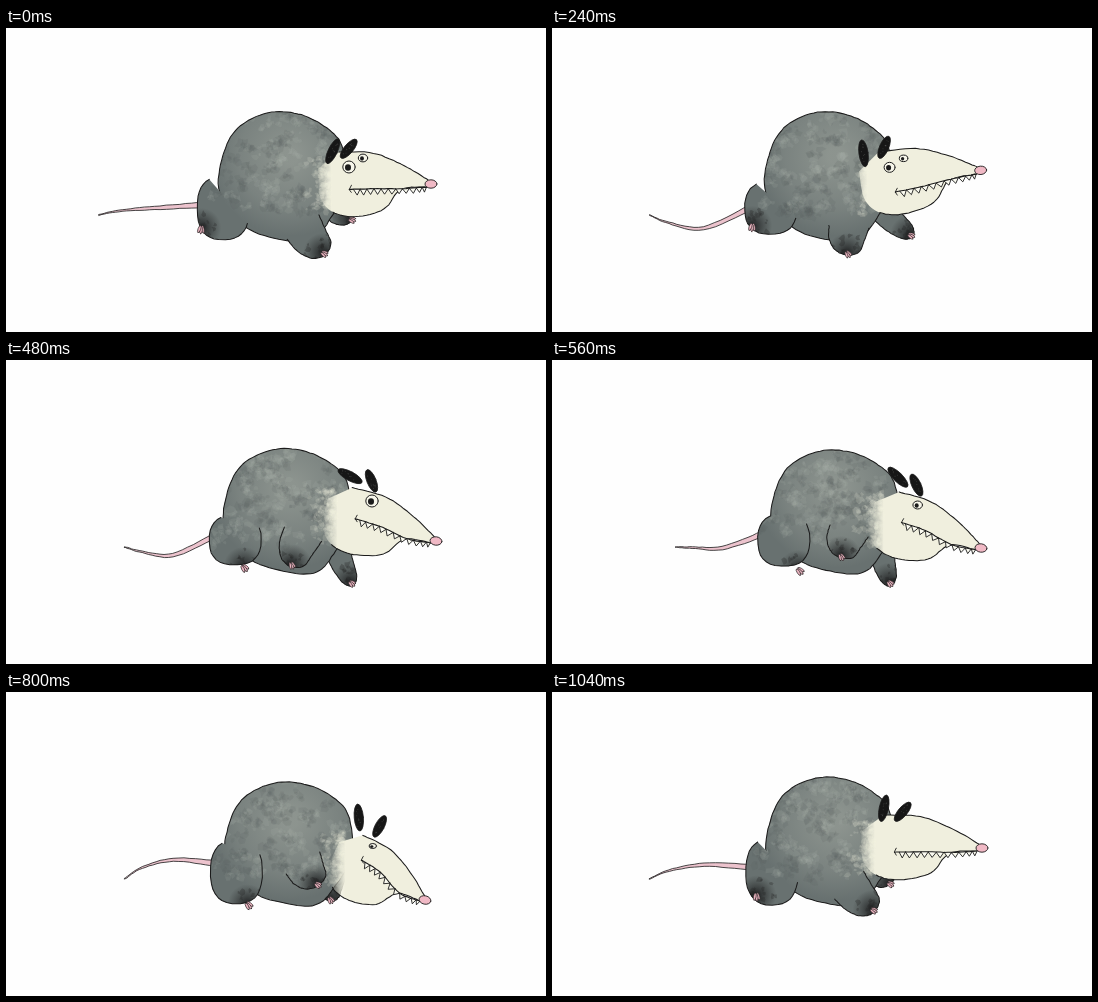
An HTML page with a canvas for the animation above (1.12 s loop, 540 by 304 pixels).

```html
<!DOCTYPE html>
<html lang="en">
<head>
<meta charset="utf-8">
<title>Trotting opossum</title>
<style>
html, body { margin: 0; width: 100%; height: 100%; overflow: hidden; background: #fefefe; }
canvas { display: block; width: 540px; height: 304px; }
</style>
</head>
<body>
<canvas id="stage" width="540" height="304"></canvas>
<script>
const W = 540, H = 304, STEP = 80, COUNT = 14;
const ctx = document.getElementById('stage').getContext('2d');
const INK = '#1b1b1b', CREAM = '240,239,222', PINK = '#e9b3bf';
const RAD = Math.PI / 180;

const clamp = (v, lo, hi) => Math.max(lo, Math.min(hi, v));
const mix = (a, b, t) => a + (b - a) * t;

let seed = 1;
function rnd() {
  seed = (seed * 16807) % 2147483647;
  return seed / 2147483647;
}
const span = (a, b) => mix(a, b, rnd());

// --- Motion -------------------------------------------------------------

// The head acts between these drawings; everything else swings with the gait.
const BEATS = [0, 2, 5, 6, 8, 10, 13];
const acting = {
  skullX: [330, 326, 332, 335, 335, 340, 328],
  skullY: [158, 161, 153, 160, 168, 173, 157],
  noseX: [425, 428, 430, 430, 428, 419, 430],
  noseY: [156, 147, 133, 181, 195, 208, 156],
  roll: [5, -7, 12, 35, 34, 28, 15],
  earA: [25, 20, -63, -62, -28, -5, 12],
  earB: [40, 50, -30, -22, -28, 28, 40],
  eye: [6, 5.5, 4, 6, 2, 2.5, 0]
};

function act(k) {
  const i = BEATS.filter(b => b <= k).length - 1, j = (i + 1) % BEATS.length;
  const t = (k - BEATS[i]) / ((BEATS[j] || COUNT) - BEATS[i]);
  const out = {};
  for (const name in acting) out[name] = mix(acting[name][i], acting[name][j], t);
  return out;
}

function gait(k) {
  const wave = (mid, amp, peak) => mid + amp * Math.cos((k - peak) / COUNT * 2 * Math.PI);
  return {
    shift: wave(3, 4, 8.5),
    near: [wave(303, 18, 12.5), Math.min(225, wave(211, 22, 1.8))],
    far: [wave(341, 17, 3), wave(207, 16, 6.5)],
    rear: [wave(221, 30, 8.2), wave(205, 8, 9)],
    thigh: wave(29, 4.5, 12),
    root: wave(176, 5, 3),
    sag: wave(184, 18, 4),
    tip: wave(108, 17, 8)
  };
}

// --- Drawing helpers ----------------------------------------------------

// Catmull-Rom samples, eight per span.
function spline(pts, closed) {
  const n = pts.length, out = [];
  const pt = i => pts[closed ? (i + n) % n : clamp(i, 0, n - 1)];
  for (let i = 0; i < (closed ? n : n - 1); i++) {
    const [a, b, c, d] = [pt(i - 1), pt(i), pt(i + 1), pt(i + 2)];
    for (let t = 0; t < 1; t += 1 / 8) {
      out.push([0, 1].map(m => b[m] + .5 * t * (c[m] - a[m] +
        t * (2 * a[m] - 5 * b[m] + 4 * c[m] - d[m] + t * (3 * (b[m] - c[m]) + d[m] - a[m])))));
    }
  }
  if (!closed) out.push(pt(n - 1));
  return out;
}

function trace(pts, closed, shake = 0) {
  ctx.beginPath();
  for (const [x, y] of pts) ctx.lineTo(x + span(-shake, shake), y + span(-shake, shake));
  if (closed) ctx.closePath();
}

function fill(pts, style) {
  trace(pts, true);
  ctx.fillStyle = style;
  ctx.fill();
}

function ink(pts, closed, width = 1.05) {
  trace(pts, closed, .25);
  ctx.strokeStyle = INK;
  ctx.lineWidth = width;
  ctx.stroke();
}

function oval(x, y, rx, ry, deg, style, line) {
  ctx.beginPath();
  ctx.ellipse(x, y, rx, ry, deg * RAD, 0, 7);
  ctx.fillStyle = style;
  ctx.fill();
  if (!line) return;
  ctx.strokeStyle = INK;
  ctx.lineWidth = line;
  ctx.stroke();
}

function blot(g, x, y, r, style) {
  g.fillStyle = style;
  g.beginPath();
  for (let a = 0; a < 7; a++) {
    const q = r * span(.4, 1.4);
    g.lineTo(x + q * Math.cos(a * .9), y + q * Math.sin(a * .9));
  }
  g.fill();
}

function clipped(pts, paint) {
  ctx.save();
  trace(pts, true);
  ctx.clip();
  paint();
  ctx.restore();
}

// Watercolour fur shared by trunk and legs.
function makeFur() {
  const c = document.createElement('canvas');
  c.width = W;
  c.height = H;
  const g = c.getContext('2d');
  g.fillStyle = '#687170';
  g.fillRect(0, 0, W, H);
  const glow = g.createRadialGradient(284, 128, 8, 284, 128, 80);
  glow.addColorStop(0, 'rgba(165,171,163,.6)');
  glow.addColorStop(.6, 'rgba(150,157,151,.4)');
  glow.addColorStop(1, 'rgba(150,157,151,0)');
  g.fillStyle = glow;
  g.fillRect(0, 0, W, H);
  for (let i = 0; i < 90; i++) {
    const x = span(205, 345), y = span(85, 185);
    const tone = rnd() < .5 ? 'rgba(180,185,174,.13)' : 'rgba(84,95,95,.15)';
    for (let j = 0; j < 6; j++) blot(g, x + span(-7, 7), y + span(-5, 5), span(1.5, 5), tone);
  }
  return ctx.createPattern(c, 'no-repeat');
}

// --- Body parts ---------------------------------------------------------

function drawLimb(pts, fur, [x, y]) {
  fill(pts, fur);
  clipped(pts, () => {
    const shade = ctx.createRadialGradient(x, y, 2, x, y, 20);
    shade.addColorStop(0, 'rgba(28,29,30,.85)');
    shade.addColorStop(1, 'rgba(45,48,48,0)');
    ctx.fillStyle = shade;
    ctx.fillRect(x - 20, y - 20, 40, 40);
    for (let i = 0; i < 24; i++) {
      const a = span(0, 6.3), d = span(3, 19);
      blot(ctx, x + d * Math.cos(a), y + d * Math.sin(a), span(1, 3.2), 'rgba(34,36,36,.3)');
    }
  });
  ink(pts, false);
}

function drawToes([x, y], angle, size) {
  ctx.save();
  ctx.translate(x, y);
  ctx.rotate(angle);
  ctx.scale(size, size);
  for (const s of [-1, 0, 1]) oval(2.5 - Math.abs(s), s * 2, 4.2, 1.5, s * 14, PINK, .7);
  ctx.restore();
}

// A leg narrows from the shoulder to the paw.
function drawLeg([sx, sy], paw, width, fur) {
  const dx = paw[0] - sx, dy = paw[1] - sy, len = Math.hypot(dx, dy);
  const at = (t, w) => [sx + dx * t - dy / len * w * width, sy + dy * t + dx / len * w * width];
  drawLimb(spline([at(0, 1), at(.5, .95), at(.92, .6), at(1.08, 0),
    at(.92, -.6), at(.5, -.8), at(0, -1)]), fur, paw);
  drawToes(paw, Math.atan2(dy, dx) * .6, .8);
}

function drawThigh(hip, paw, ry, fur) {
  const round = v => Math.sign(v) * Math.pow(Math.abs(v), .8);
  const last = 25 - (paw[0] - 194) * 1.1;
  const pts = [];
  for (let i = 0; i <= 24; i++) {
    const a = mix(242, last, i / 24) * RAD;
    pts.push([hip + 26 * round(Math.cos(a)), 180 + ry * round(Math.sin(a))]);
  }
  drawLimb(pts, fur, paw);
  drawToes(paw, Math.atan2(paw[1] - 180, paw[0] - hip) * .7, .9);
}

function drawTail(x, g) {
  const mid = spline([[x, g.root], [mix(x, g.tip, .45), g.sag],
    [mix(x, g.tip, .8), mix(g.sag, 187, .4)], [g.tip, 187]]);
  const n = mid.length - 1;
  const side = sign => mid.map(([px, py], i) => {
    const a = mid[Math.max(0, i - 1)], b = mid[Math.min(n, i + 1)];
    const len = Math.hypot(b[0] - a[0], b[1] - a[1]) || 1;
    const w = sign * (.3 + 2.5 * Math.pow(1 - i / n, 1.5));
    return [px - (b[1] - a[1]) / len * w, py + (b[0] - a[0]) / len * w];
  });
  const up = side(1), low = side(-1);
  fill([...up, ...low.slice().reverse()], '#ecc3cd');
  ink(up, false, .8);
  ink(low, false, .8);
}

function drawMouth(lip) {
  const n = lip.length - 1;
  const at = u => lip[Math.round(u * n)];
  for (let i = 0; i < 11; i++) {
    const a = at((i + 1) / 12), b = at((i + 1.95) / 12);
    const dx = b[0] - a[0], dy = b[1] - a[1], len = Math.hypot(dx, dy) || 1;
    const h = 6 - i * .12;
    const tooth = [a, [(a[0] + b[0]) / 2 - dy / len * h, (a[1] + b[1]) / 2 + dx / len * h], b];
    fill(tooth, '#fafaf0');
    ink(tooth, false, .9);
  }
  ink(lip, false, 1.1);
  const [x, y] = lip[0];
  ink([[x + 2, y - 4], [x, y], [x + 2, y + 3]], false, .9);
}

function drawHead(p, body) {
  const dx = p.noseX - p.skullX, dy = p.noseY - p.skullY, len = Math.hypot(dx, dy);
  const tilt = Math.atan2(dy, dx) / RAD;
  // u runs from skull to nose, v is the distance below that line.
  const at = ([u, v]) => [p.skullX + dx * u - dy / len * v, p.skullY + dy * u + dx / len * v];
  const top = spline([[.04, -34], [.4, -32], [.72, -19], [.97, -4]].map(at));
  const chin = spline([[.95, 3], [.68, 5], [.5, 24], [.2, 31],
    [-.04, 26], [-.17, 10], [-.18, -18]].map(at));
  const lift = 3 - .57 * tilt;
  const lip = spline([[.14, lift], [.4, mix(lift, 3, .25)], [.7, 4], [.95, 3]].map(at));

  const [cx, cy] = at([-.17, 0]);
  const soft = clamp(18 + 1.3 * tilt, 5, 18);
  const edge = ctx.createLinearGradient(cx - 3, 0, cx + soft * .7, 0);
  edge.addColorStop(0, `rgba(${CREAM},${1 - soft / 18})`);
  edge.addColorStop(1, `rgb(${CREAM})`);
  fill([...top, ...chin], edge);
  clipped(body, () => {
    for (let i = 0; i < soft * 8; i++) {
      const out = rnd() * rnd();
      blot(ctx, cx + soft * (.6 - 1.6 * out), cy + span(-28, 26), span(1, 4), `rgba(${CREAM},.16)`);
    }
  });
  ink(top, false);
  ink(chin.slice(0, 33), false);
  drawMouth(lip);
  oval(p.noseX, p.noseY, 6, 4.2, tilt * .5, '#f0b9c5', .9);
}

function drawFace(p) {
  const ex = p.skullX + 10 + .6 * p.roll, ey = p.skullY - 19;
  const eye = (x, y, r) => {
    oval(x, y, r * .7 + 2, r, 0, '#f7f6ea', 1);
    oval(x - 1, y + .5, Math.max(1.6, r * .5), Math.max(1.2, r * .55), 0, INK);
  };
  if (p.eye > .5) {
    if (p.roll < 14) eye(ex + 14, ey - 9, p.eye * .65);
    eye(ex, ey, p.eye);
  }
  const ear = (x, y, len, tilt) => {
    const s = Math.sin(tilt * RAD), c = Math.cos(tilt * RAD);
    x += p.skullX + len * s;
    y += p.skullY - len * c;
    oval(x, y, 4.6, len, tilt, '#161616', .8);
    for (let i = 0; i < 9; i++) {
      const u = span(-2, 2), v = span(-.7, .7) * len;
      blot(ctx, x + u * c - v * s, y + u * s + v * c, .6, 'rgba(110,112,110,.4)');
    }
  };
  ear(p.roll - 14, -20 - .5 * p.roll, 13.5, p.earA);
  ear(p.roll, -28, 12, p.earB);
}

// --- Frames -------------------------------------------------------------

const trunk = [[214, 165], [217, 128], [232, 100], [262, 85], [292, 86], [318, 98],
  [336, 118], [340, 160], [325, 190], [306, 212], [277, 212], [240, 199]];
const furs = [];

function draw(k) {
  seed = 911 + k * 7717;
  const fur = furs[k] || (furs[k] = makeFur());
  seed = 3001 + k * 5171;
  const p = act(k), g = gait(k);
  const body = spline(trunk.map(([x, y]) => [x + g.shift, y + g.shift * (212 - y) / 127]), true);
  const hip = 217 + .28 * (g.rear[0] - 194);
  const raise = clamp(1.4 * (222 - g.near[1]), 0, 28);

  ctx.fillStyle = '#fefefe';
  ctx.fillRect(0, 0, W, H);
  ctx.lineJoin = ctx.lineCap = 'round';
  drawTail(hip - 23, g);
  drawLeg([328, 180], g.far, 13, fur);
  fill(body, fur);
  ink(body, true);
  drawThigh(hip, g.rear, g.thigh, fur);
  drawHead(p, body);
  drawLeg([297, 199 - raise], g.near, 20, fur);
  drawFace(p);
}

let shown = -1;
const start = performance.now();
function tick() {
  const k = Math.floor((performance.now() - start) / STEP) % COUNT;
  if (k !== shown) draw(shown = k);
  requestAnimationFrame(tick);
}
tick();
</script>
</body>
</html>
```
